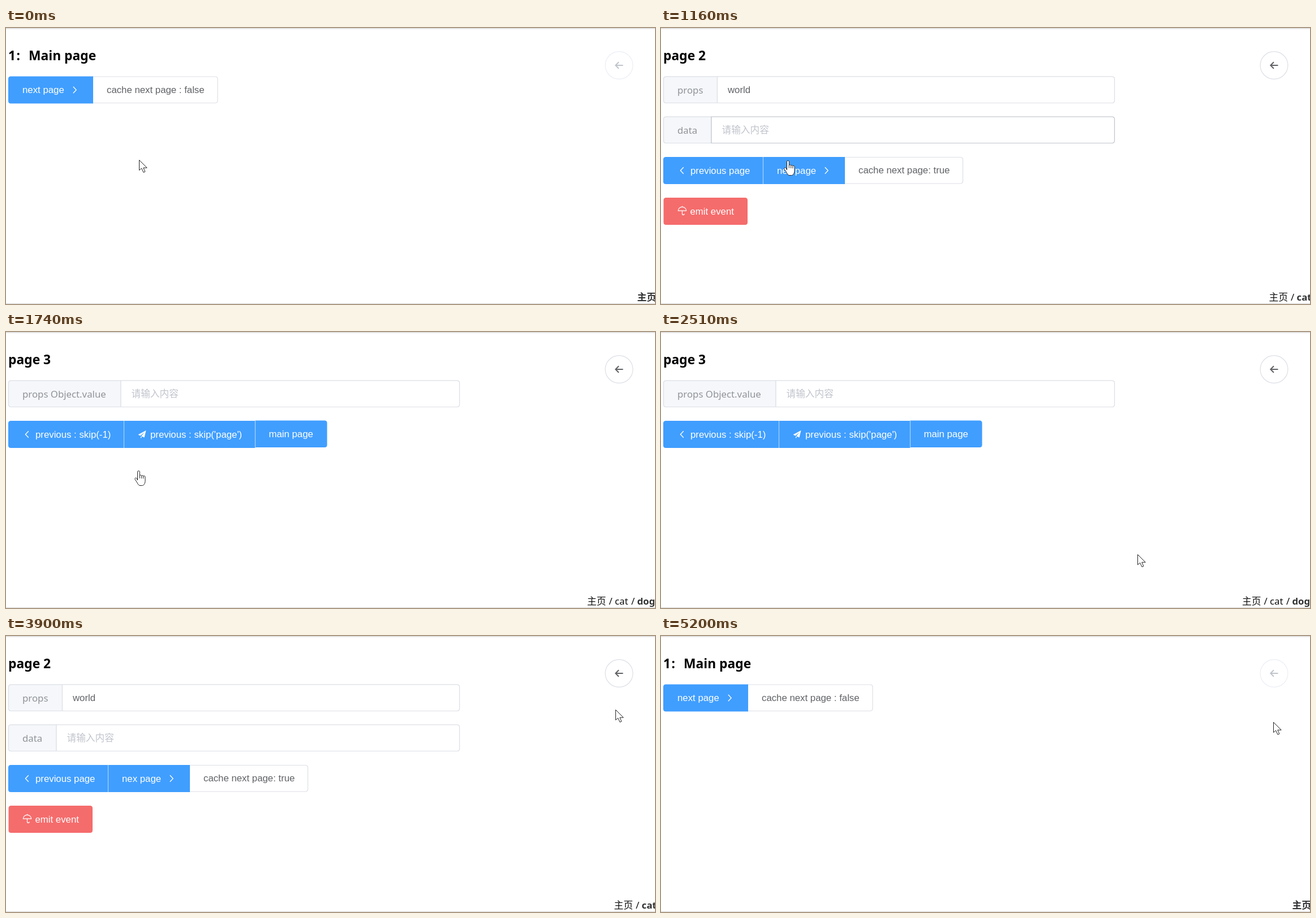
Write an HTML page that moves like this. It is 1147 px wide and 488 px high and loops after 5270 ms.

```html
<!DOCTYPE html>
<html lang="zh-CN">
<head>
<meta charset="utf-8">
<title>Page stack</title>
<style>
  html, body { margin: 0; width: 100%; height: 100%; overflow: hidden; background: #fff; }
  svg { display: block; }
  .ui { font: 16.8px "Liberation Sans", Arial, sans-serif; }
  .label { font: 16.8px "Noto Sans", "Noto Sans CJK SC", "Noto Sans CJK", sans-serif; }
  .hint { font: 16.7px "Noto Sans CJK SC", "Noto Sans CJK", sans-serif; }
  .title { font: bold 22.8px "Noto Sans", "Open Sans", sans-serif; }
  .strong { font-weight: bold; }
</style>
</head>
<body>
<svg id="stage" width="1147" height="488" viewBox="0 0 1147 488"></svg>
<script>
const LOOP = 5270;
const BLUE = '#409eff', HOVER = '#66b1ff', ACTIVE = '#3a8ee6', BORDER = '#dcdfe6', FOCUS = '#c0c4cc';
const stage = document.getElementById('stage');

const text = (x, y, cls, fill, str) => `<text x="${x}" y="${y}" class="${cls}" fill="${fill}">${str}</text>`;
const line = (d, color, width = 1.3) => `<path d="${d}" fill="none" stroke="${color}" stroke-width="${width}"/>`;
const chevron = (x, y, dir) => line(`M${x} ${y - 5.7}l${5.4 * dir} 5.7l${-5.4 * dir} 5.7`, '#fff');

// A box whose left and right corners are rounded separately.
function box(x, y, w, h, left, right, attrs) {
  const l = left ? 4.5 : 0, r = right ? 4.5 : 0;
  return `<path d="M${x + l} ${y}H${x + w - r}q${r} 0 ${r} ${r}V${y + h - r}q0 ${r} ${-r} ${r}` +
    `H${x + l}q${-l} 0 ${-l} ${-l}V${y + l}q0 ${-l} ${l} ${-l}z" ${attrs}/>`;
}
const outline = (x, y, w, h, left, right, id = '') =>
  box(x, y, w, h, left, right, `id="${id}" fill="#fff" stroke="${BORDER}" stroke-width="1.2"`);
const button = (x, y, w, left, right, id = '') =>
  box(x, y, w, 48, left, right, `id="${id}" fill="${BLUE}"`);
const divider = (x, y) => line(`M${x} ${y}v48`, 'rgba(255,255,255,.55)', 1.2);

function field(y, split, label, value, isHint, id) {
  return outline(4.5, y, 797, 46.5, true, true) +
    box(4.5, y, split - 4.5, 46.5, true, false, `fill="#f5f7fa" stroke="${BORDER}" stroke-width="1.2"`) +
    outline(split, y, 801.5 - split, 46.5, false, true, id) +
    text(29, y + 29.5, 'label', '#909399', label) +
    text(split + 18.5, y + 29, isHint ? 'hint' : 'ui', isHint ? FOCUS : '#606266', value);
}

// Trail entries: [x, name, bold]
const trail = items => items.map(([x, name, bold]) =>
  text(x, 482, 'label' + (bold ? ' strong' : ''), bold ? '#303133' : '#111', name)).join('');

const pages = [
  text(4, 57, 'title', '#000', '1') + text(18.5, 57, 'title', '#000', ':') +
  text(40, 57, 'title', '#000', 'Main page') +
  outline(153.5, 86, 220.5, 46.5, false, true) + button(4, 85.5, 150, true, false, 'next1') +
  text(29, 115, 'ui', '#fff', 'next page') + chevron(118.8, 109.5, 1) +
  text(178, 114.5, 'ui', '#606266', 'cache next page : false') +
  trail([[1115.5, '主页', true]]),

  text(4, 57, 'title', '#000', 'page 2') +
  field(86, 99.5, 'props', 'world', false, 'props') +
  field(157, 89, 'data', '请输入内容', true, 'data') +
  outline(324.5, 228.5, 209, 46.5, false, true) +
  button(4, 228, 177, true, false) + button(180.5, 228, 144.5, false, false, 'next2') + divider(180.5, 228) +
  chevron(39.8, 252, -1) + text(52, 257.5, 'ui', '#fff', 'previous page') +
  text(205, 257.5, 'ui', '#fff', 'nex page') + chevron(289.8, 252, 1) +
  text(349, 257, 'ui', '#606266', 'cache next page: true') +
  box(4.5, 300, 148.5, 48, true, true, 'fill="#f56c6c"') +
  line('M30.3 323.2a7.2 6.8 0 0 1 14.4 0zM37.5 316.4v-1.6M37.5 323.2v5.2q0 2 1.8 2t1.8-2', '#fff', 1.2) +
  text(51.5, 329.5, 'ui', '#fff', 'emit event') +
  trail([[1074.5, '主页'], [1113, '/'], [1123.5, 'cat', true]]),

  text(4, 57, 'title', '#000', 'page 3') +
  field(86, 203, 'props Object.value', '请输入内容', true, 'object') +
  button(4, 157, 205, true, false) + button(208.5, 157, 232.5, false, false) +
  box(440.5, 156.5, 127, 47.5, false, true, `fill="${BLUE}"`) + divider(208.5, 157) + divider(440.5, 157) +
  chevron(39.8, 181, -1) + text(52, 186.5, 'ui', '#fff', 'previous : skip(-1)') +
  '<path d="M247.5 174L233.5 181.5l4 2 7-6.2-5.3 7 5.3 2.2zM238 184.7v3.3l2.2-2.3z" fill="#fff"/>' +
  text(255, 186.5, 'ui', '#fff', "previous : skip('page')") +
  text(464.5, 186, 'ui', '#fff', 'main page') +
  trail([[1027, '主页'], [1065.5, '/'], [1076, 'cat'], [1105, '/'], [1115.5, 'dog', true]])
];

const cursors = {
  arrow: '<path d="M.5 .5V18.6L4.6 15L8 22.3L10.9 21L7.8 14.2H14.2z" fill="#fff" stroke="#222"/>',
  hand: '<path transform="translate(-6 0)" d="M5.5 17V2.4a1.9 1.9 0 0 1 3.8 0V9.5c0-2 3.4-2 3.4.3 0-1.8 3.2-1.6 3.2.6' +
    ' 0-1.6 3.1-1.4 3.1 1V18c0 4-2 8.5-5.5 8.5H10c-3 0-4.5-4-6-6.5L1 15.5c-1-2 1.5-3.5 3-1.8z' +
    'M9.3 9.5v4.3M12.7 10v4M15.9 10.6v3.6" fill="#fff" stroke="#222"/>',
  beam: '<path d="M-4-10.2h3l1 1 1-1h3M0-9.2V9.2M-4 10.2h3l1-1 1 1h3" fill="none" stroke="#fff" stroke-width="1.5"/>'
};

stage.innerHTML = '<rect width="1147" height="488" fill="#fff"/>' +
  line('M0 1H1147M0 487.5H1147', '#dcdcdc', 1.3) +
  pages.map((p, i) => `<g id="page${i + 1}">${p}</g>`).join('') +
  '<g id="back" stroke-width="1.2"><circle cx="1083.5" cy="66" r="24.4"/>' +
  '<path d="M1090.5 66H1077.5M1083 60.3L1077.3 66L1083 71.7" fill="none" stroke-width="2"/></g>' +
  '<circle id="press" r="14.5" fill="#ff0" fill-opacity=".6"/>' +
  Object.entries(cursors).map(([k, v]) =>
    `<g id="${k}"${k === 'beam' ? ' style="mix-blend-mode:difference"' : ''}>${v}</g>`).join('');

const el = id => document.getElementById(id);
const set = (id, name, value) => el(id).setAttribute(name, value);
const show = (id, on) => set(id, 'display', on ? 'inline' : 'none');
const within = (t, a, b) => t >= a && t < b;
const latest = (list, t) => list.filter(e => t >= e[0]).pop()[1];

// Pointer moves: start, end, step count, then [progress, x, y] points.
const moves = [
  [120, 620, 9, [[0, 235, 233], [.3, 207, 211], [.75, 125, 137], [1, 109, 118]]],
  [970, 1360, 7, [[0, 109, 118], [.43, 190, 190], [.571, 223, 234], [1, 233, 245]]],
  [2060, 2580, 9, [[0, 233, 245], [.25, 330, 266], [.75, 770, 374], [1, 900, 409]]],
  [2640, 3010, 6, [[0, 900, 409], [.6, 1050, 458], [1, 1087, 471]]],
  [3510, 4020, 9, [[0, 1087, 471], [.2, 1088, 420], [.6, 1081, 195], [.778, 1077, 130], [1, 1070, 110]]],
  [4080, 4570, 7, [[0, 1070, 110], [.43, 1128, 92], [.7, 1110, 74], [1, 1081, 67]]],
  [5130, 5200, 2, [[0, 1081, 67], [.5, 1082, 120], [1, 1082, 152]]]
];
const kinds = [[0, 'arrow'], [550, 'beam'], [1155, 'hand'], [2060, 'arrow'], [2930, 'hand'],
  [3560, 'arrow'], [4490, 'hand'], [5130, 'arrow']];
const pageTimes = [[0, 1], [830, 2], [1740, 3], [3330, 2], [4780, 1]];
const presses = [[760, 830], [1670, 1740], [3260, 3330], [4710, 4780]];

function pointer(t) {
  const move = moves.filter(m => t >= m[0]).pop();
  if (!move) return moves[0][3][0].slice(1);
  const [start, end, steps, points] = move;
  const u = Math.min(steps, Math.floor((t - start + 6) * (steps - 1) / (end - start)) + 1) / steps;
  const i = Math.max(1, points.findIndex(p => p[0] >= u - 1e-6));
  const [a, b] = [points[i - 1], points[i]];
  const k = Math.min(1, (u - a[0]) / (b[0] - a[0]));
  return [a[1] + (b[1] - a[1]) * k, a[2] + (b[2] - a[2]) * k];
}

function render(t) {
  const page = latest(pageTimes, t), kind = latest(kinds, t);
  const [x, y] = pointer(t).map(Math.round);
  for (let i = 1; i <= 3; i++) show('page' + i, i === page);
  for (const k in cursors) {
    show(k, k === kind);
    set(k, 'transform', `translate(${x} ${y})`);
  }
  show('press', presses.some(p => within(t, ...p)));
  set('press', 'cx', x + 2);
  set('press', 'cy', y + 1);

  set('next1', 'fill', within(t, 690, 830) ? ACTIVE : within(t, 550, 690) ? HOVER : BLUE);
  set('next2', 'fill', within(t, 1600, 1740) ? ACTIVE : within(t, 1225, 1600) ? HOVER : BLUE);
  set('props', 'stroke', within(t, 830, 1040) ? FOCUS : BORDER);
  set('data', 'stroke', within(t, 1040, 1230) ? FOCUS : BORDER);

  const over = within(t, 4490, 4780), down = within(t, 4640, 4780);
  const [fill, ring, ink] = page === 1 ? ['#fff', '#ebeef5', FOCUS]
    : down ? ['#ecf5ff', ACTIVE, ACTIVE]
    : over ? ['#ecf5ff', '#c6e2ff', BLUE] : ['#fff', BORDER, '#606266'];
  const [circle, arrow] = el('back').children;
  circle.setAttribute('fill', fill);
  circle.setAttribute('stroke', ring);
  arrow.setAttribute('stroke', ink);
}

function tick() {
  render(performance.now() % LOOP);
  requestAnimationFrame(tick);
}
tick();
</script>
</body>
</html>
```
